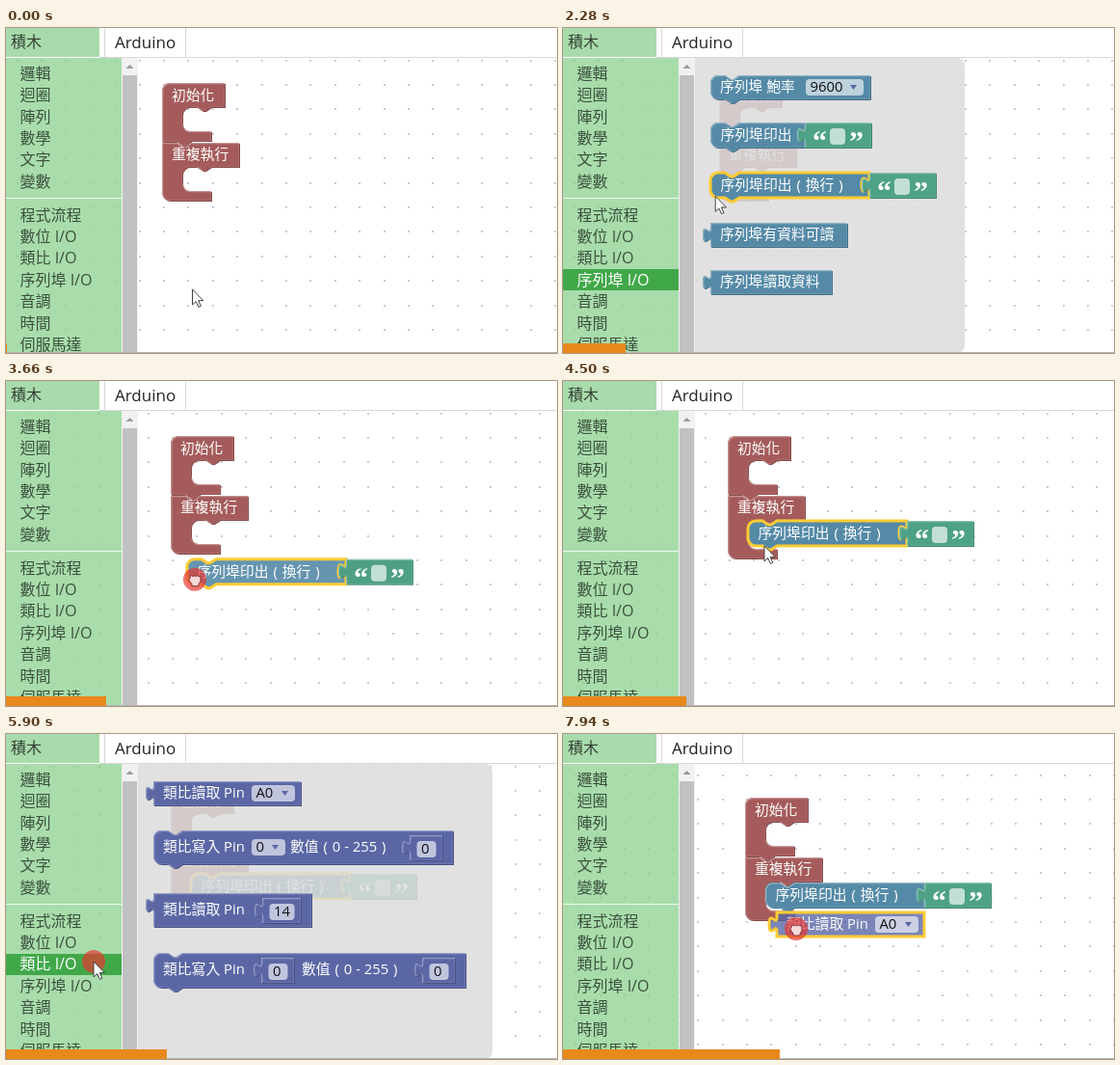
Animation of 572x337 px, one loop 8000 ms. Source, as an HTML page with a canvas:

```html
<!DOCTYPE html>
<html lang="zh-Hant">
<head>
<meta charset="utf-8">
<title>積木</title>
<style>
  html, body { margin: 0; width: 100%; height: 100%; overflow: hidden; background: #fff; }
  canvas { display: block; }
</style>
</head>
<body>
<canvas id="stage" width="572" height="337"></canvas>
<script>
const ctx = document.getElementById('stage').getContext('2d');
const LOOP = 8000;
const FONT = '"Open Sans", "Noto Sans CJK TC", "Noto Sans CJK JP", "Noto Sans CJK", sans-serif';
const RED = [165, 91, 91], BLUE = [85, 138, 167], TEAL = [78, 162, 135], INDIGO = [91, 103, 165];

// Moments at which the state changes at once
const OPEN_SERIAL = 1660, DRAG_PRINT = 2620, DROP_PRINT = 4350, OPEN_ANALOG = 5830, DRAG_READ = 7620;
const CLICKS = [[1640, 1750], [2570, DROP_PRINT], [5800, 5960], [7560, LOOP]];

const POINTER = [ // time, x, y
  [0, 193.5, 271], [400, 193.5, 271], [830, 160, 278], [1400, 113, 265], [1590, 111, 263],
  [1750, 111, 263], [2350, 160, 171], [2600, 160, 171], [2970, 170, 230], [3400, 185, 222],
  [4050, 216, 176], [4250, 209, 171], [4600, 209, 171], [5050, 150, 212], [5700, 91, 236],
  [6000, 91, 236], [6700, 148, 88], [7000, 183, 62], [7400, 183, 62], [7550, 173, 66],
  [7640, 190, 69], [7940, 242, 202], [LOOP, 246, 206]
];

const ROWS = ['邏輯', '迴圈', '陣列', '數學', '文字', '變數',
  '程式流程', '數位 I/O', '類比 I/O', '序列埠 I/O', '音調', '時間', '伺服馬達'];
const ROW_HEIGHT = 22.4, ANALOG_ROW = 8, SERIAL_ROW = 9;
const rowCentre = i => 47 + i * ROW_HEIGHT + (i > 5 ? 12.4 : 0);

// Parentheses with third-of-an-em spaces, as wide as full-width ones
const wideParens = text => `\u2004(\u2004${text}\u2004)`;
const PRINT_LINE = '序列埠印出' + wideParens('換行');
const VALUE_RANGE = '數值' + wideParens('0 - 255');

// Block outlines
const NOTCH = 'l6,4 3,0 6,-4', NOTCH_BACK = 'l-6,4 -3,0 -6,-4';
const TOP_LEFT = 'M0,8a8,8 0 0 1 8,-8', BOTTOM_LEFT = 'H8a8,8 0 0 1 -8,-8Z';
const SOCKET = 'v5c0,10 -8,-8 -8,7.5s8,-2.5 8,7.5';

const bracket = (w, inner, first) => (first ? TOP_LEFT : 'M0,0H15' + NOTCH) +
  `H${w}v25H51${NOTCH_BACK}h-7a8,8 0 0 0 -8,8v${inner - 16}a8,8 0 0 0 8,8H51v10` +
  (first ? `H30v1${NOTCH_BACK}H0Z` : BOTTOM_LEFT);
const statement = (w, h, socket) =>
  `${TOP_LEFT}H15${NOTCH}H${w}${socket ? SOCKET : ''}V${h}H30${NOTCH_BACK}${BOTTOM_LEFT}`;
const output = (w, h) => `M0,0H${w}V${h}H0V20c0,-10 -8,8 -8,-7.5s8,2.5 8,-7.5Z`;

const mix = (color, target, amount) =>
  `rgb(${color.map(c => Math.round(c + (target - c) * amount))})`;

function box(x, y, w, h, fill) {
  ctx.fillStyle = fill;
  ctx.fillRect(x, y, w, h);
}

function roundBox(x, y, w, h, radius, fill) {
  ctx.fillStyle = fill;
  ctx.beginPath();
  ctx.roundRect(x, y, w, h, radius);
  ctx.fill();
}

function label(text, x, centre, color = '#fff', size = 14.8) {
  ctx.font = `${size}px ${FONT}`;
  ctx.fillStyle = color;
  ctx.fillText(text, x, centre + size * 0.36);
}

function drawShape(outline, x, y, color, selected, alpha = 1) {
  const path = new Path2D(outline);
  ctx.save();
  ctx.globalAlpha *= alpha;
  ctx.translate(x, y);
  if (!selected) {
    ctx.translate(1, 1);
    ctx.fillStyle = mix(color, 0, 0.2);
    ctx.fill(path);
    ctx.translate(-1, -1);
  }
  ctx.fillStyle = mix(color, 255, 0);
  ctx.fill(path);
  if (selected) {
    ctx.globalAlpha = 1;
    ctx.strokeStyle = '#fc3';
    ctx.lineWidth = 3;
    ctx.stroke(path);
  } else {
    // Shifted stroke leaves a light edge on the top and left only
    ctx.clip(path);
    ctx.translate(0.5, 0.5);
    ctx.strokeStyle = mix(color, 255, 0.35);
    ctx.lineWidth = 1.5;
    ctx.stroke(path);
  }
  ctx.restore();
}

function field(text, x, centre, w, dropdown) {
  roundBox(x, centre - 8, w, 17, 4, 'rgba(255,255,255,.62)');
  label(text, x + 4.5, centre, '#111');
  if (!dropdown) return;
  ctx.fillStyle = mix(INDIGO, 0, 0);
  ctx.beginPath();
  ctx.moveTo(x + w - 14, centre - 2);
  ctx.lineTo(x + w - 7, centre - 2);
  ctx.lineTo(x + w - 10.5, centre + 3);
  ctx.fill();
}

function numberBlock(text, x, centre, w) {
  drawShape(output(w, 26), x, centre - 13, INDIGO);
  field(text, x + 7.5, centre + 1, w - 14);
}

function textBlock(x, y, alpha) {
  drawShape(output(69, 26), x, y, TEAL, false, alpha);
  roundBox(x + 26, y + 6, 16, 17, 4, 'rgba(255,255,255,.66)');
  ctx.font = 'bold 30px "Liberation Serif", serif';
  ctx.fillStyle = '#fff';
  ctx.fillText('“', x + 8, y + 29);
  ctx.fillText('”', x + 46, y + 29);
}

function printBlock(text, w, x, y, selected, alpha) {
  drawShape(statement(w, 26, true), x, y, BLUE, selected, alpha);
  textBlock(x + w, y, alpha);
  label(text, x + 10.5, y + 13);
}

const printLine = (...place) => printBlock(PRINT_LINE, 165, ...place);

function analogRead(x, y, selected, alpha) {
  drawShape(output(153, 25), x, y, INDIGO, selected, alpha);
  label('類比讀取 Pin', x + 10, y + 12);
  field('A0', x + 102, y + 12, 45, true);
}

function serialFlyout(hovered) {
  drawShape(statement(166, 25), 153, 49, BLUE);
  label('序列埠 鮑率', 163, 61);
  field('9600', 252, 61, 60, true);
  printBlock('序列埠印出', 98, 153, 98);
  printLine(153, 150, hovered);
  drawShape(output(142, 25), 153, 202, BLUE);
  label('序列埠有資料可讀', 163, 214);
  drawShape(output(126, 25), 153, 251, BLUE);
  label('序列埠讀取資料', 163, 263);
}

function analogFlyout(hovered) {
  analogRead(153, 49, hovered);

  drawShape(statement(311, 35), 153, 100, INDIGO);
  label('類比寫入 Pin', 163, 117);
  field('0', 255, 117, 35, true);
  label(VALUE_RANGE, 295, 117);
  numberBlock('0', 419, 118, 34);

  drawShape(output(164, 35), 153, 165, INDIGO);
  label('類比讀取 Pin', 163, 182);
  numberBlock('14', 266, 183, 40);

  drawShape(statement(324, 36), 153, 227, INDIGO);
  label('類比寫入 Pin', 163, 244);
  numberBlock('0', 265, 245, 34);
  label(VALUE_RANGE, 307, 244);
  numberBlock('0', 432, 245, 34);
}

function drawWorkspace(t, x, y) {
  const spacing = 25.4;
  for (let gx = (x + 1) % spacing; gx < 572; gx += spacing)
    for (let gy = (y + 1) % spacing; gy < 337; gy += spacing)
      box(Math.round(gx), Math.round(gy), 2, 2, '#cbcbcb');

  const dropped = t >= DROP_PRINT;
  drawShape(bracket(65, 25, true), x, y, RED);
  drawShape(bracket(80, dropped ? 30 : 25, false), x, y + 62, RED);
  label('初始化', x + 10, y + 13);
  label('重複執行', x + 10, y + 74);
  if (dropped) printLine(x + 21, y + 88, t < DRAG_READ);

  const ripple = (t - DROP_PRINT) / 150;
  if (ripple > 0 && ripple < 1) {
    ctx.strokeStyle = '#888';
    ctx.lineWidth = 10 * (1 - ripple);
    ctx.beginPath();
    ctx.arc(x + 2, y + 91, 25 * ripple, 0, 7);
    ctx.stroke();
  }
}

function drawFlyout(width, content, hovered) {
  roundBox(137, 31, width, 306, [0, 8, 8, 0], 'rgba(221,221,221,.86)');
  content(hovered);
}

function drawToolbox(pointer, selectedRow) {
  box(0, 31, 120, 306, 'rgba(139,210,143,.75)');
  box(0, 176, 120, 1, '#eef6ee');
  ROWS.forEach((name, i) => {
    const centre = rowCentre(i), top = Math.round(centre - 11);
    const hovered = pointer.x < 120 && Math.abs(pointer.y - centre) < ROW_HEIGHT / 2;
    if (i === selectedRow) box(0, top, 120, 22, '#41a849');
    else if (hovered) box(0, top, 120, 22, '#e3e3e3');
    label(name, 14.5, centre, i === selectedRow ? '#fff' : '#3d503f', 16);
  });

  const overThumb = pointer.x > 120 && pointer.x < 137 && pointer.y > 49;
  box(120, 31, 17, 306, '#f1f1f1');
  box(121, 49, 15, 288, overThumb ? '#a8a8a8' : '#c1c1c1');
  ctx.fillStyle = '#999';
  ctx.beginPath();
  ctx.moveTo(124.5, 42);
  ctx.lineTo(128.5, 38);
  ctx.lineTo(132.5, 42);
  ctx.fill();
}

function drawTabs() {
  box(0, 0, 572, 31, '#fff');
  box(0, 0, 97, 30, '#a8dbab');
  box(97, 30, 475, 1, '#d8d8d8');
  box(102, 0, 1, 30, '#d8d8d8');
  box(186, 0, 1, 30, '#d8d8d8');
  label('積木', 5, 14.5, '#333f34', 16);
  label('Arduino', 113, 14.5, '#222', 17);
}

function pointerAt(t) {
  const next = Math.max(1, POINTER.findIndex(p => p[0] > t));
  const [t0, x0, y0] = POINTER[next - 1], [t1, x1, y1] = POINTER[next];
  const p = (t - t0) / (t1 - t0), eased = p * p * (3 - 2 * p);
  return { x: x0 + (x1 - x0) * eased, y: y0 + (y1 - y0) * eased };
}

function drawPointer({ x, y }, pressed, dragging) {
  if (pressed) {
    ctx.fillStyle = 'rgba(230,55,50,.7)';
    ctx.beginPath();
    ctx.arc(x, y, 12, 0, 7);
    ctx.fill();
  }
  const shape = new Path2D(dragging
    ? 'M-5,-1V-3q1.5,-2 3,0q1.5,-2 3,0q1.5,-2 3,0q2,-1 2,1V2L4,5V7H-3V5L-6,1q0,-2 1,-2Z'
    : 'M0,0V16L3.7,12.6 6.4,18.4 8.8,17.3 6.2,11.6H11.3Z');
  ctx.save();
  ctx.translate(x, y);
  ctx.fillStyle = dragging ? '#f6d9d9' : '#fff';
  ctx.strokeStyle = dragging ? '#8c2a2a' : '#444';
  ctx.lineWidth = 1;
  ctx.fill(shape);
  ctx.stroke(shape);
  ctx.restore();
}

function render(t) {
  const pointer = pointerAt(t);
  const within = (from, to) => t >= from && t < to;
  const draggingPrint = within(DRAG_PRINT, DROP_PRINT), draggingRead = t >= DRAG_READ;
  const serialOpen = within(OPEN_SERIAL, DRAG_PRINT), analogOpen = within(OPEN_ANALOG, DRAG_READ);
  const over = (x, y, w, h) =>
    pointer.x >= x && pointer.x <= x + w && pointer.y >= y && pointer.y <= y + h;

  box(0, 0, 572, 337, '#fff');
  drawWorkspace(t, draggingRead ? 189 : t >= DRAG_PRINT ? 171 : 162, draggingRead ? 66 : 57);
  if (serialOpen) drawFlyout(280, serialFlyout, over(153, 150, 165, 26));
  if (analogOpen) drawFlyout(368, analogFlyout, over(153, 49, 153, 25));
  if (draggingPrint) printLine(pointer.x - 8, pointer.y - 21, true, 0.9);
  if (draggingRead) analogRead(pointer.x - 20, pointer.y - 17, true, 0.8);

  drawToolbox(pointer, serialOpen ? SERIAL_ROW : analogOpen ? ANALOG_ROW : -1);
  drawTabs();
  box(0, 336, 572, 1, '#b4b4b4');
  box(0, 327, Math.ceil(t * 0.0283), 10, '#e8891c');
  drawPointer(pointer, CLICKS.some(([from, to]) => within(from, to)), draggingPrint || draggingRead);
}

function tick(now) {
  render(now % LOOP);
  requestAnimationFrame(tick);
}
requestAnimationFrame(tick);
</script>
</body>
</html>
```
